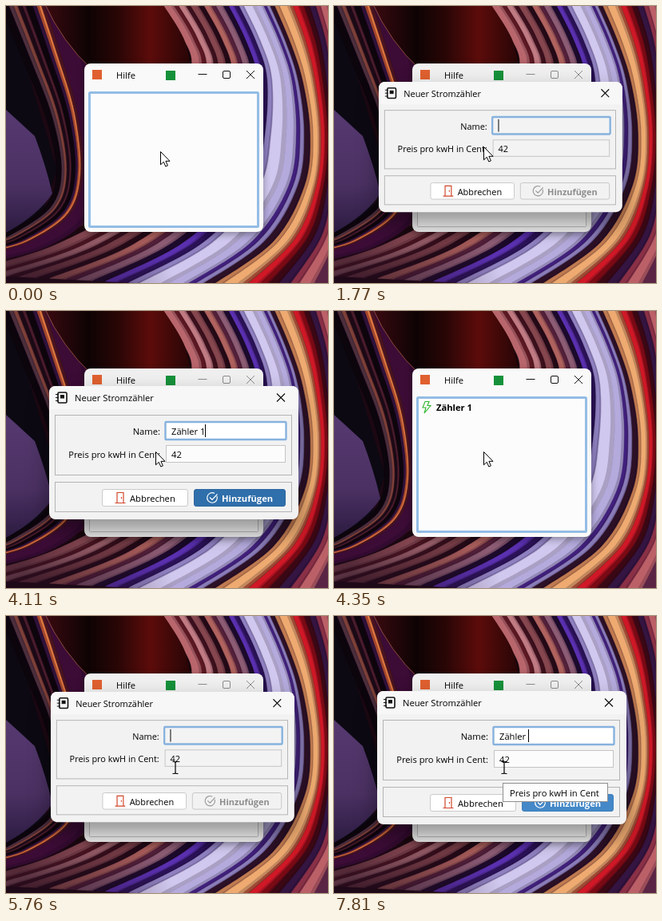
An HTML page for the animation above (8 s loop, 403x347 px).

```html
<!DOCTYPE html>
<html lang="de">
<head>
<meta charset="utf-8">
<title>Neuer Stromzähler</title>
<style>
html, body { margin: 0; width: 100%; height: 100%; overflow: hidden; background: #1a0a18; }
svg { display: block; width: 403px; height: 347px; }
text { font: 11.2px "Open Sans", "Noto Sans", sans-serif; white-space: pre; fill: #000; }
.bold { font-weight: 700; }
.line { fill: none; stroke: #111; }
#main { filter: drop-shadow(0 3px 5px rgba(0,0,0,.35)); }
#dialog { filter: drop-shadow(0 14px 14px rgba(0,0,0,.42)); }
#list { fill: #fcfcfc; stroke: #93bde6; stroke-width: 3; }
#main.inactive #list { stroke: #bdbdbd; stroke-width: 1; fill: #f6f6f6; }
#main.inactive .line { stroke: #8c8c8c; }
#main.inactive .frame { fill: #f0f0f0; }
#menu { filter: drop-shadow(2px 1px 1px rgba(0,0,0,.15)); }
#menu .bar { fill: none; }
#menu.hot .bar { fill: #2675bf; }
#menu.hot text { fill: #fff; }
.group { fill: none; stroke: #b4b4b4; }
.field { fill: #fcfcfc; stroke: #c4c4c4; }
#name { fill: #fff; stroke: #87b2de; stroke-width: 2.4; }
#dialog.opening .field { fill: #f3f3f3; }
#add .box { fill: #4488c8; stroke: #3f80bd; }
#add .tick { fill: none; stroke: #fff; stroke-width: 1.2; }
#add text { fill: #fff; }
#add.off .box { fill: #f2f2f2; stroke: #c8c8c8; }
#add.off .tick { stroke: #9a9a9a; }
#add.off text { fill: #8c8c8c; }
#add.pressed .box { fill: #2f6fab; stroke: #2c68a0; }
</style>
</head>
<body>
<svg viewBox="0 0 403 347">
  <defs>
    <linearGradient id="patch" x2="0" y2="1">
      <stop stop-color="#563970"/><stop offset=".6" stop-color="#4b3163"/><stop offset="1" stop-color="#2c1b40"/>
    </linearGradient>
    <linearGradient id="hollow">
      <stop stop-color="#3a0a10"/><stop offset=".3" stop-color="#0e0304"/><stop offset=".5" stop-color="#2a0606"/>
      <stop offset=".72" stop-color="#5c0c0a"/><stop offset="1" stop-color="#260506"/>
    </linearGradient>
    <linearGradient id="gloom" gradientUnits="userSpaceOnUse" x1="30" y1="345" x2="190" y2="285">
      <stop stop-color="#200a1c" stop-opacity=".65"/><stop offset="1" stop-color="#200a1c" stop-opacity="0"/>
    </linearGradient>
  </defs>
  <g id="wallpaper"></g>

  <g id="main">
    <rect class="frame" x="98" y="72" width="224" height="211" rx="8" fill="#f9f9f9"/>
    <rect x="108" y="80" width="12" height="12" fill="#e0602f"/>
    <text x="138" y="91">Hilfe</text>
    <rect x="200" y="81" width="12" height="12" fill="#16913a"/>
    <path class="line" d="M240.5 85.5h11M301 81l10 10m0-10l-10 10"/>
    <rect class="line" x="271.500" y="81.500" width="9" height="9" rx="1.500"/>
    <rect id="list" x="104.500" y="108.500" width="211" height="168" rx="1"/>
    <g id="entry">
      <path d="M114 113.500h5l-2 5h4l-8 9.500 2-7h-4z" fill="none" stroke="#2fb52f" stroke-width="1.100"/>
      <text class="bold" x="128" y="125">Zähler 1</text>
    </g>
  </g>

  <g id="menu">
    <rect x=".5" y=".5" width="145" height="29" fill="#fff" stroke="#b5b5b5"/>
    <rect class="bar" x="1" y="4" width="144" height="22"/>
    <path d="M8 15a6.500 6.500 0 1 0 13 0a6.500 6.500 0 1 0-13 0M11 15h7M14.500 11.500v7" fill="none" stroke="#16ac36" stroke-width="1.300"/>
    <text x="29" y="20">neuer Stromzähler</text>
  </g>

  <g id="dialog">
    <rect x="54" y="94" width="312" height="167" rx="8" fill="#f2f2f2"/>
    <path d="M54 123v-21a8 8 0 0 1 8-8h296a8 8 0 0 1 8 8v21z" fill="#f7f7f7"/>
    <g class="line">
      <rect x="65" y="102" width="11" height="13" rx="1.500" stroke-width="1.600"/>
      <rect x="68.500" y="105.500" width="4" height="3.500" fill="#111"/>
      <path d="M62 104.500h4m-4 4h4m-4 4h4"/>
      <path d="M339 103.500l10 10m0-10l-10 10" stroke-width="1.200"/>
    </g>
    <text x="86" y="113">Neuer Stromzähler</text>
    <rect class="group" x="61.500" y="130.500" width="296" height="75"/>
    <rect class="group" x="61.500" y="214.500" width="296" height="37"/>
    <text x="193" y="155" text-anchor="end">Name:</text>
    <text x="193" y="184" text-anchor="end">Preis pro kwH in Cent:</text>
    <rect class="field" id="name" x="199.500" y="139" width="151" height="22" rx="1"/>
    <rect class="field" x="200.500" y="168.500" width="149" height="21"/>
    <text id="typed" x="207" y="155"></text>
    <rect id="caret" y="142" width="1" height="16"/>
    <text x="207" y="184">42</text>
    <rect x="120.500" y="223.500" width="107" height="21" rx="2.500" fill="#fff" stroke="#cacaca"/>
    <path d="M139 240.500v-13h8v13M136.500 240.500h13M144.500 233v2" fill="none" stroke="#d2462a" stroke-width="1.200"/>
    <text x="155" y="239">Abbrechen</text>
    <g id="add">
      <rect class="box" x="235.500" y="223.500" width="114" height="21" rx="2.500"/>
      <path class="tick" d="M264 232a6.300 6.300 0 1 1-3-3.600M255 233.500l3 3 6.500-7"/>
      <text class="bold" x="270" y="239">Hinzufügen</text>
    </g>
  </g>

  <g id="tooltip">
    <rect x="211.500" y="209.500" width="131" height="23" fill="#fdfdfd" stroke="#8f8f8f"/>
    <text x="220" y="226">Preis pro kwH in Cent</text>
  </g>

  <path id="arrow" d="M.5 .5v16.300l3.800-3.500 2.500 5.700 2.600-1.100-2.500-5.600h5.100z" fill="#fff" stroke="#000"/>
  <path id="beam" d="M-3.500-7.500h2.500l1 1 1-1h2.500M0-6.500v13M-3.500 7.500h2.500l1-1 1 1h2.500" fill="none" stroke="#000" stroke-width="1.200"/>
</svg>

<script>
const $ = id => document.getElementById(id);

// Wallpaper: nested ribbons, each lying between two blends of a pair of guide curves
const pinkEdge = [[195, -4], [222, 40], [232, 80], [205, 160], [170, 235], [60, 300], [-60, 335]];
const orangeEdge = [[335, -4], [356, 45], [372, 95], [381, 160], [374, 225], [335, 295], [255, 352]];
const redEdge = [[372, -4], [388, 45], [397, 95], [403, 160], [398, 225], [378, 290], [325, 352]];
const foldInner = [[-10, -5], [20, 65], [50, 140], [63, 205], [50, 250], [0, 285], [-20, 292]];
const foldOuter = [[75, -5], [92, 60], [108, 130], [112, 210], [95, 265], [45, 300], [-20, 318]];

// Colour of each ribbon with the place where it starts along the top edge
const swirlRibbons = [
  [125, '#2a0a1c'], [150, '#5a2436'], [162, '#1a0810'], [174, '#4a1628'], [186, '#180608'],
  [195, '#b8666c'], [208, '#5c1822'], [214, '#c07a82'], [223, '#3c101c'], [229, '#86464e'],
  [239, '#240a16'], [246, '#b0625e'], [255, '#54203a'], [261, '#8c5c74'], [270, '#1c0a2c'],
  [277, '#5a30b0'], [284, '#2b1258'], [290, '#8f80c0'], [296, '#d0c8ee'], [311, '#b4aadc'],
  [321, '#41207c'], [325, '#8a7cb8'], [329, '#2c1026'], [335, '']
];
const rimRibbons = [
  [335, '#c07a50'], [341, '#eeaa70'], [354, '#a04a34'], [358, '#d01826'], [366, '#7a0a14'],
  [372, '#3a0814'], [379, '#341440'], [387, '#8a3046'], [393, '#bc6068'], [403, '#5a2444'], [416, '#6a2c4c'], [440, '']
];
const foldRibbons = [
  [-10, '#0c050c'], [2, '#4c2e3c'], [8, '#7e4038'], [13, '#1c0a16'], [19, '#4a1c2c'],
  [23, '#0e050c'], [32, '#30123c'], [37, '#a8482e'], [40, '#e07840'], [43, '#4a1420'], [48, '#3c0c36'], [85, '']
];

const blend = (a, b, s) => a.map(([x, y], i) => [x + (b[i][0] - x) * s, y + (b[i][1] - y) * s]);

function spline(pts) {
  const p = i => pts[Math.max(0, Math.min(pts.length - 1, i))];
  let d = p(0).join();
  for (let i = 0; i < pts.length - 1; i++) {
    const handle = (at, from, to, k) => at.map((v, n) => (v + (to[n] - from[n]) * k / 6).toFixed(1));
    d += `C${handle(p(i), p(i - 1), p(i + 1), 1)} ${handle(p(i + 1), p(i), p(i + 2), -1)} ${p(i + 1)}`;
  }
  return d;
}

function ribbons(inner, outer, list) {
  const start = inner[0][0], span = outer[0][0] - start;
  const band = (from, to, paint) => {
    const [a, b] = [from, to].map(x => blend(inner, outer, (x - start) / span));
    return `<path d="M${spline(a)}L${spline(b.reverse())}Z" ${paint}/>`;
  };
  return list.slice(0, -1).map(([x, color], i) => {
    const next = list[i + 1][0];
    return band(x, next, `fill="${color}" stroke="${color}" stroke-width=".5"`) +
      band(x + (next - x) * .7, next, 'fill="#10001a" opacity=".2"');
  }).join('');
}

$('wallpaper').innerHTML = '<rect width="403" height="347" fill="#1c0812"/>' +
  ribbons(pinkEdge, orangeEdge, swirlRibbons) +
  ribbons(orangeEdge, redEdge, rimRibbons) +
  '<path d="M0 240H240V347H0Z" fill="url(#gloom)"/>' +
  '<path d="M0 0L22 65 64 205 45 260 0 287Z" fill="#0c0913"/>' +
  '<path d="M0 130L36 163Q50 200 58 235 40 262 0 284Z" fill="url(#patch)"/>' +
  ribbons(foldInner, foldOuter, foldRibbons) +
  `<path d="M48-4Q70 45 108 80L232 80L${spline(pinkEdge.slice(0, 3).reverse())}Z" fill="url(#hollow)"/>` +
  '<path d="M48-4Q70 45 108 80" fill="none" stroke="#8c4a3c"/>';

// Each track lists [start time, ...values]
const tracks = {
  pointer: [[0, 193, 182], [430, 185, 178], [550, 174, 171], [670, 166, 166], [1220, 186, 175],
    [1390, 187, 176], [5300, 195, 181], [5450, 212, 188], [5760, 212, 190], [5930, 213, 190]],
  menu: [[0, ''], [1100, 'plain'], [1220, 'hot'], [1650, ''], [5030, 'plain'], [5450, 'hot'], [5760, '']],
  dialog: [[0, ''], [1770, 'opening'], [1920, 'open'], [4230, 'closing'], [4350, ''], [5760, 'opening'], [5930, 'open']],
  typed: [[0, ''], [2330, 'Z'], [2750, 'Zä'], [3030, 'Zäh'], [3310, 'Zähle'], [3580, 'Zähler '], [3860, 'Zähler 1'],
    [5760, ''], [6580, 'Z'], [7150, 'Zä'], [7300, 'Zäh'], [7570, 'Zähle'], [7690, 'Zähler'], [7810, 'Zähler ']],
  caret: [[0, true], [2210, false], [2330, true], [6180, false], [6580, true], [7010, false], [7150, true]]
};
const dialogPose = {
  opening: 'translate(56 95) scale(.977) translate(-54 -94)',
  closing: 'translate(210 177) scale(.95) translate(-210 -177)'
};

const show = (id, on) => $(id).style.display = on ? '' : 'none';
const move = (id, x, y) => $(id).setAttribute('transform', `translate(${x} ${y})`);

function draw(t) {
  const at = name => tracks[name].findLast(step => step[0] <= t).slice(1);
  const [menu] = at('menu'), [dialog] = at('dialog'), [typed] = at('typed'), [caret] = at('caret');

  $('main').setAttribute('class', dialog ? 'inactive' : '');
  show('entry', t >= 4350);

  show('menu', menu);
  $('menu').setAttribute('class', menu);
  if (t < 5030) move('menu', 166, 166); else move('menu', 187, 176);

  show('dialog', dialog);
  $('dialog').setAttribute('class', dialog);
  $('dialog').setAttribute('transform', dialogPose[dialog] || '');
  $('dialog').style.opacity = dialog === 'closing' ? .5 : 1;
  $('typed').textContent = typed;
  $('caret').setAttribute('x', 207 + Math.round(dialog && typed ? $('typed').getComputedTextLength() : 0));
  show('caret', caret);
  $('add').setAttribute('class', !typed ? 'off' : t >= 4110 && t < 4350 ? 'pressed' : '');
  show('tooltip', t >= 6580);

  const overField = t >= 5760;
  show('arrow', !overField);
  show('beam', overField);
  move(overField ? 'beam' : 'arrow', ...at('pointer'));
}

const begin = performance.now();
function frame() {
  draw((performance.now() - begin) % 8000);
  requestAnimationFrame(frame);
}
frame();
</script>
</body>
</html>
```
